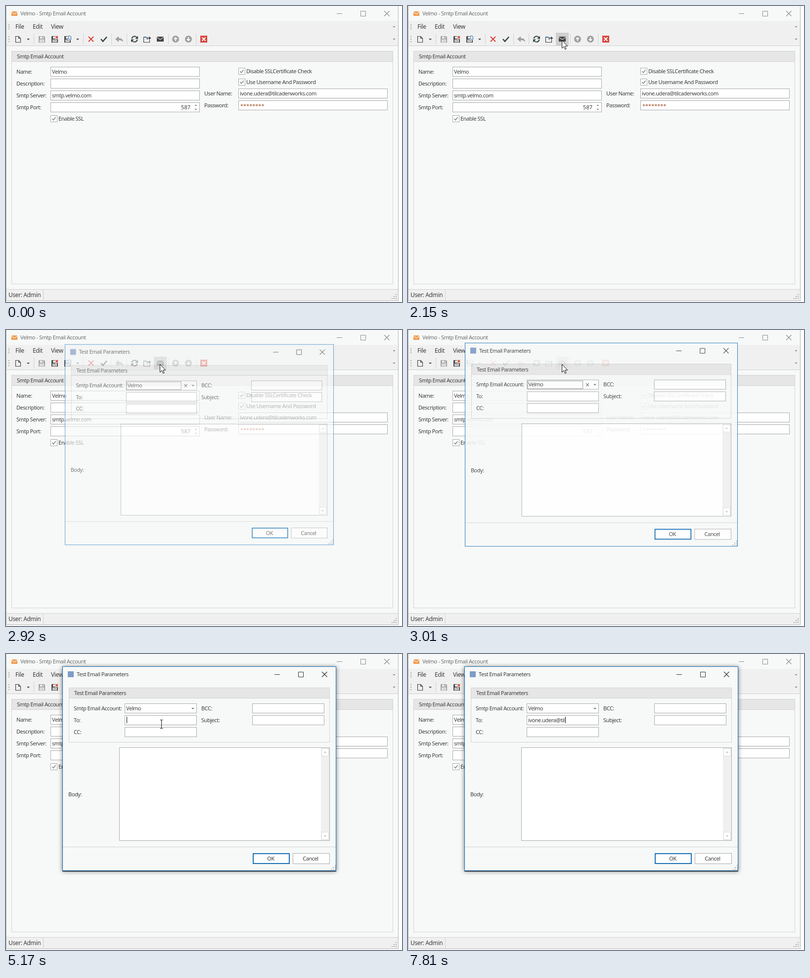
An HTML page that plays this animation: 801x599 px, repeating every 8000 ms.

```html
<!DOCTYPE html>
<html lang="en">
<head>
<meta charset="utf-8">
<title>Email account form</title>
<style>
html, body { margin: 0; width: 100%; height: 100%; overflow: hidden; background: #fff; }
svg { display: block; }
text { font: 11px "Noto Sans", "Open Sans", sans-serif; letter-spacing: -.46px; fill: #3c3c3c; white-space: pre; }
text.ui { font-size: 12px; letter-spacing: -.38px; }
</style>
</head>
<body>
<svg id="stage" width="801" height="599" viewBox="0 0 801 599"></svg>
<script>
const BG = '#f7f9f8', BAR = '#f0f0f0', EDGE = '#ababab', SOFT = '#d2d2d2', INK = '#444', GREY = '#a0a0a0', RED = '#d9483b', BLUE = '#1a70b7';
const ACCOUNT = 'Velmo', MAIL = 'ivone.udera@tilcadenworks.com';
const LOOP = 8000;

// Markup helpers
const box = (x, y, w, h, fill) => `<rect x="${x}" y="${y}" width="${w}" height="${h}" fill="${fill}"/>`;
const frame = (x, y, w, h, fill = '#fff', edge = EDGE) =>
  `<rect x="${x + .5}" y="${y + .5}" width="${w - 1}" height="${h - 1}" fill="${fill}" stroke="${edge}"/>`;
const label = (x, y, s, attrs = '') => `<text x="${x}" y="${y}" ${attrs}>${s}</text>`;
const ui = (x, y, s) => label(x, y, s, 'class="ui"');
const line = (d, color = INK, w = 1) => `<path d="${d}" fill="none" stroke="${color}" stroke-width="${w}"/>`;
const fill = (d, color = INK) => `<path d="${d}" fill="${color}"/>`;
const at = (x, y, s) => `<g transform="translate(${x} ${y})">${s}</g>`;
const down = (x, y, r = 3, color = INK) => fill(`M${x - r} ${y}h${2 * r}l${-r} ${r}z`, color);
const up = (x, y, r = 3, color = INK) => fill(`M${x - r} ${y}h${2 * r}l${-r} ${-r}z`, color);
const field = (x, y, w, s = '') => frame(x, y, w, 20) + label(x + 3, y + 14, s);
const check = (x, y, s) => frame(x, y, 14, 14) +
  line(`M${x + 3.5} ${y + 7}l2.5 3 4.5-6`, '#777', 1.3) + label(x + 16, y + 11, s);
const split = x => box(x, 56, 1, 22, SOFT);
const grip = (x, ys) => ys.map(y => box(x, y, 2, 2, '#aaa')).join('');
const corner = (x, y) => [[0, 0], [-4, 0], [-8, 0], [0, -4], [-4, -4], [0, -8]]
  .map(([a, b]) => box(x + a, y + b, 2, 2, '#aaa')).join('');
const group = (x, y, w, h, s) => frame(x, y, w, h, 'none', SOFT) +
  frame(x, y, w, 22, '#e6e6e6', SOFT) + label(x + 11, y + 15, s);
const controls = (x, y, color) => line(`M${x - 53} ${y + .5}h11`, color) +
  line(`M${x - 4.5} ${y - 4.5}h10v10h-10z`, color) +
  line(`M${x + 43} ${y - 5}l10.5 10.5m0-10.5l-10.5 10.5`, color, 1.1);
const envelope = (x, y, w, h, color, seam) => box(x, y, w, h, color) +
  line(`M${x} ${y + 1}l${w / 2} ${h * .5} ${w / 2} ${-h * .5}`, seam, 1.1);
const disk = color => fill('M0 0h11l2 2v11h-13z', color) + box(3, 1, 7, 4, BAR) +
  box(7, 1, 2, 3, color) + box(2, 7, 9, 5, BAR) + box(3, 9, 7, 1, color);
const round = (x, d) => `<circle cx="${x}" cy="67" r="7" fill="${GREY}"/>` + line(d, '#fff', 1.8);

function toolbar() {
  return grip(5, [61, 66, 71]) +
    line('M19.5 61.5h6l4 4v8h-10zM25.5 61.5v4h4', INK, 1.2) + down(45, 66) + split(56) +
    at(66, 61, disk('#a5a5a5')) +
    at(92, 61, disk(INK) + box(7, -1, 7, 7, BAR) + line('M8.5 0l4.5 4.5m0-4.5l-4.5 4.5', RED, 1.9)) +
    at(118, 61, disk(INK) + box(7, -1, 7, 9, BAR) + line('M8.5-.5h3l2 2v5h-5z', '#3a78b5', 1.1)) +
    down(145, 66) + split(156) +
    line('M167 62l10 10m0-10l-10 10', RED, 2.2) +
    line('M192 67l4 4.5 8-9', '#35493f', 2.6) + split(213) +
    fill('M221 67l7-6v4c6 0 9 3 9 8-2-3-5-4-9-4v4z', GREY) + split(244) +
    line('M254.5 66a5.6 5.6 0 0 1 10-2.5M265.5 68a5.6 5.6 0 0 1-10 2.5', '#35493f', 2) +
    fill('M267 60.500v6h-6zM253 73.500v-6h6z', '#35493f') +
    line('M286 63.500h-7.500v10h12v-5', INK, 1.2) + box(278, 62, 6, 2, '#3a78b5') +
    line('M285.500 68v-3h6', INK, 1.5) + fill('M289 61.500l4.500 3.500-4.500 3.500z') +
    '<rect id="hot" x="299" y="54" width="26" height="26"/>' +
    envelope(305, 62, 14, 10, INK, '#d5d5d5') + split(328) +
    round(343, 'M343 71v-7m-3 3l3-3 3 3') + round(369, 'M369 63v7m-3-3l3 3 3-3') + split(384) +
    box(393, 60, 14, 14, RED) + line('M396.500 63.500l7 7m0-7l-7 7', '#fff', 1.8) +
    down(785, 41, 2.5, '#777') + down(785, 66, 2.5, '#777');
}

function mainWindow() {
  return box(0, 0, 794, 597, BG) + box(0, 30, 794, 50, BAR) + box(0, 80, 794, 1, SOFT) +
    envelope(11, 11, 12, 9, '#ee9a4d', '#fff3e4') +
    label(29, 19, ACCOUNT + ' - Smtp Email Account', 'style="fill:#6c6c6c"') + controls(722, 15, '#8c8c8c') +
    grip(5, [37, 41, 45]) + ui(19, 46, 'File') + ui(54, 46, 'Edit') + ui(91, 46, 'View') + toolbar() +
    group(11, 91, 772, 472, 'Smtp Email Account') +
    ['Name:', 'Description:', 'Smtp Server:', 'Smtp Port:'].map((s, i) => label(21, 137 + 24 * i, s)).join('') +
    field(90, 123, 302, ACCOUNT) + field(90, 147, 302) + field(90, 171, 302, 'smtp.velmo.com') + field(90, 195, 302) +
    label(373, 209, '587', 'text-anchor="end" style="letter-spacing:0"') +
    up(384, 202, 2.5, '#777') + down(384, 208, 2.5, '#777') +
    check(90, 221, 'Enable SSL') + check(470, 125, 'Disable SSLCertificate Check') +
    check(470, 147, 'Use Username And Password') +
    label(401, 181, 'User Name:') + label(401, 205, 'Password:') +
    field(470, 167, 302, MAIL) + field(470, 191, 302) +
    label(474, 206, '********', 'style="letter-spacing:0;fill:#a0522d"') +
    box(0, 573, 794, 24, BAR) + box(0, 573, 794, 1, SOFT) + box(75, 574, 1, 22, SOFT) +
    ui(5, 589, 'User: Admin') + corner(788, 591) + frame(0, -1, 794, 598, 'none', '#b4b4b4');
}

function dialog() {
  return '<rect id="shadow" x="114" y="26" width="554" height="414" style="filter:drop-shadow(0 0 4px rgba(0,0,0,.55))"/>' +
    frame(114, 25, 554, 414, BG, BLUE) + box(125, 35, 12, 12, '#7f9cc8') +
    label(143, 45, 'Test Email Parameters') + controls(596, 41, '#333') +
    group(127, 68, 528, 111, 'Test Email Parameters') +
    label(137, 114, 'Smtp Email Account:') + label(137, 138, 'To:') + label(137, 162, 'CC:') +
    label(395, 114, 'BCC:') + label(395, 138, 'Subject:') +
    field(240, 100, 146, ACCOUNT) + down(378, 109, 3, '#777') +
    '<g id="focus"><rect x="241.5" y="102.5" width="112" height="16" fill="none" stroke="#222" stroke-dasharray="1 1"/>' +
    line('M360 107.500l6 6m0-6l-6 6', '#666', 1.2) + '</g>' +
    field(240, 124, 146) + field(240, 148, 146) + field(498, 100, 146) + field(498, 124, 146) +
    '<text id="typed" x="243" y="138"></text>' + '<rect id="caret" y="127" width="1" height="13"/>' +
    label(126, 288, 'Body:') + frame(229, 189, 426, 189) + box(637, 190, 17, 187, BAR) +
    frame(638, 191, 15, 16, '#fff', '#dcdcdc') + frame(638, 360, 15, 16, '#fff', '#dcdcdc') +
    up(645.5, 200, 3, '#c4c4c4') + down(645.5, 367, 3, '#c4c4c4') +
    box(115, 390, 552, 1, SOFT) +
    `<rect x="500" y="404" width="73" height="20" fill="#fff" stroke="${BLUE}" stroke-width="2"/>` +
    label(535.5, 418, 'OK', 'text-anchor="middle"') + frame(580, 403, 75, 22) +
    label(616, 418, 'Cancel', 'text-anchor="middle"') + corner(665, 435);
}

const stage = document.getElementById('stage');
stage.innerHTML = mainWindow() + `<g id="dialog">${dialog()}</g>` +
  '<path id="arrow" d="M.5.5v16l3.700-3.500 2.600 5.800 2.300-1-2.500-5.600h5z" fill="#fff" stroke="#111"/>' +
  '<path id="beam" d="M-3-8.500h2.500l.5.500.5-.5H3M-3 8.500h2.500l.5-.5.5.5H3M0-8V8" fill="none" stroke="#111"/>';
const $ = id => document.getElementById(id);
const show = (el, on) => el.setAttribute('visibility', on ? 'visible' : 'hidden');
const [hot, dlg, shadow, focus, typed, caret, arrow, beam] =
  ['hot', 'dialog', 'shadow', 'focus', 'typed', 'caret', 'arrow', 'beam'].map($);

// Last row whose start time has passed
const last = (rows, t) => rows.filter(r => r[0] <= t).pop();

const KEYS = [5940, 6010, 6150, 6230, 6310, 6470, 6710, 6790, 6860, 7020, 7100, 7330, 7650, 7730, 7810];
const POINTER = [
  [1760, 311, 71], [1830, 311, 70], [1900, 311, 69],
  [4010, 310, 90], [4100, 309, 104], [4170, 308, 117],
  [4240, 308, 133, 1], [4310, 308, 139, 1], [5010, 308, 142, 1],
  [5170, 314, 142, 1], [5250, 306, 140, 1], [5320, 298, 138, 1], [5400, 308, 136, 1]
];
const OPENING = [[2840, .25, .95], [2920, .65, .982], [3010, .9, .9964], [3070, 1, 1]];

function pointer(t) {
  if (t < 650 || t >= 5940) return null;
  if (t >= 1760) return last(POINTER, t);
  const rest = 1 - Math.min(9, Math.floor((t - 650) / 80 + .05)) / 9;
  return [t, Math.round(311 + 345 * rest ** 2.1), Math.round(72 + 487 * rest ** 1.71)];
}

function draw(t) {
  show(hot, t >= 2150);
  hot.setAttribute('fill', t < 2690 ? '#cfcfcf' : '#b9b9b9');

  const open = last(OPENING, t);
  dlg.style.display = open ? '' : 'none';
  if (open) {
    const [, alpha, k] = open;
    dlg.setAttribute('opacity', alpha);
    dlg.setAttribute('transform', `translate(391 232) scale(${k}) translate(-391 -232)`);
    shadow.style.display = k === 1 ? '' : 'none';
    focus.style.display = t < 5010 ? '' : 'none';
    const n = KEYS.filter(k => k <= t).length;
    typed.textContent = MAIL.slice(0, n);
    caret.setAttribute('x', 244 + (n ? Math.round(typed.getComputedTextLength() + .4) : 0));
    const since = t - (n ? KEYS[n - 1] : 5010);
    caret.style.display = since >= 0 && since % 1060 < 530 ? '' : 'none';
  }

  const p = pointer(t);
  show(arrow, p && !p[3]);
  show(beam, p && p[3]);
  if (p) (p[3] ? beam : arrow).setAttribute('transform', `translate(${p[3] ? p[1] + .5 : p[1]} ${p[2]})`);
}

const start = performance.now();
function tick() {
  draw((performance.now() - start) % LOOP);
  requestAnimationFrame(tick);
}
tick();
</script>
</body>
</html>
```
